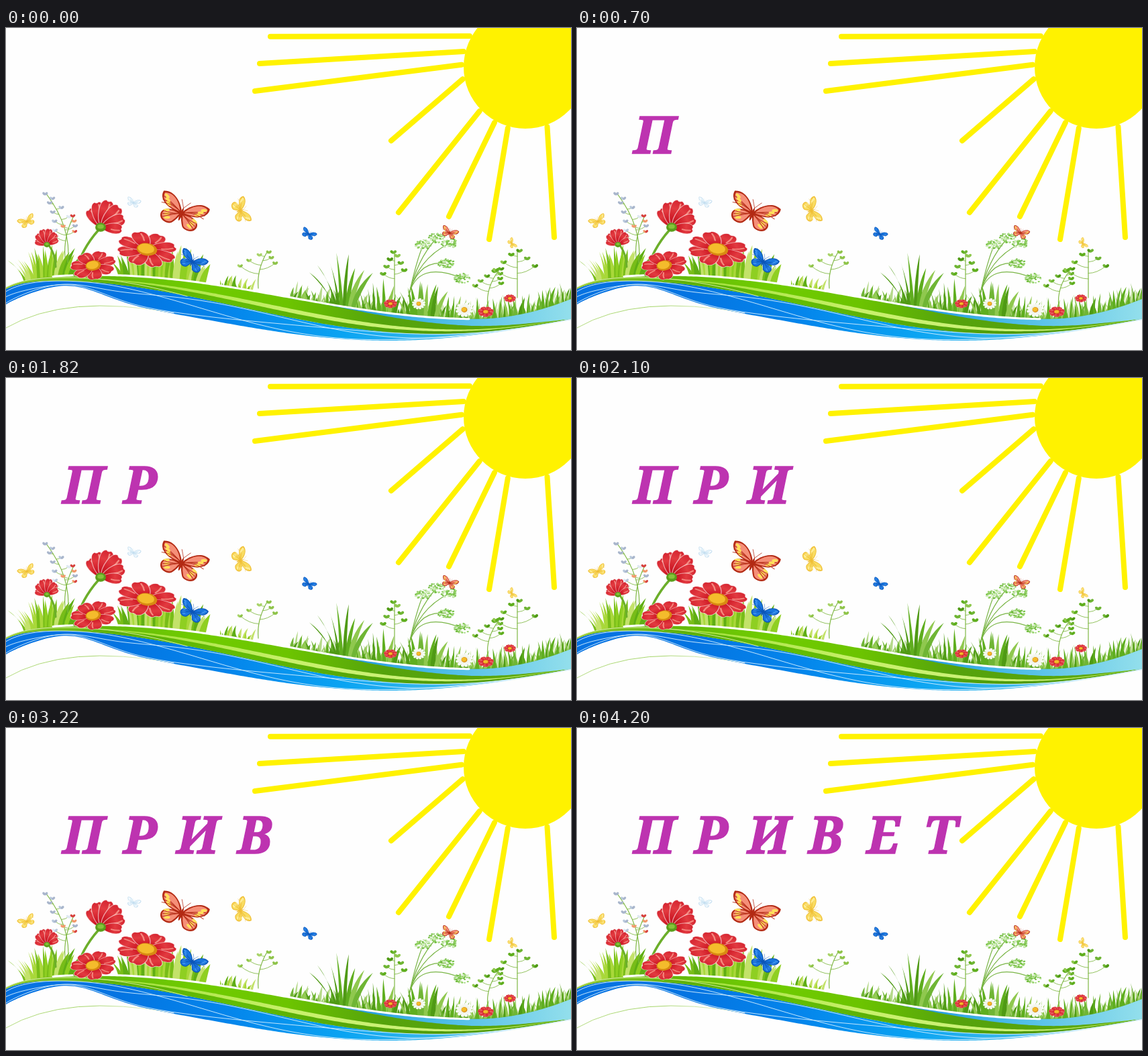
An HTML page with a canvas for the animation above (4.9 s loop, 842x480 px).

```html
<!DOCTYPE html>
<html lang="ru">
<head>
<meta charset="utf-8">
<title>Привет</title>
<style>
html, body { margin: 0; width: 842px; height: 480px; overflow: hidden; background: #fefefe; }
canvas, .word { position: absolute; left: 0; top: 0; height: 480px; }
.word { overflow: hidden; animation: type 4.9s steps(7) infinite; }
.word text {
  font: italic 900 76px "Noto Serif", "Liberation Serif", serif;
  text-anchor: middle; fill: #bd33b0; stroke: #bd33b0; stroke-width: 1.4;
}
/* Each step uncovers one 85.2px letter cell */
@keyframes type { from { width: 77px; } to { width: 673.4px; } }
</style>
</head>
<body>
<canvas width="842" height="480"></canvas>
<svg class="word"></svg>
<script>
const W = 842, H = 480;
const c = document.querySelector('canvas').getContext('2d');
const { sin, cos, exp, max, sqrt, PI } = Math;

let seed = 7;
const rnd = (a = 0, b = 1) => {
  seed = (seed * 16807) % 2147483647;
  return a + (b - a) * seed / 2147483647;
};
const pick = list => list[Math.floor(rnd(0, list.length))];

function fill(path, color) { c.fillStyle = color; c.fill(path); }

function stroke(path, color, width = 1) {
  c.strokeStyle = color;
  c.lineWidth = width;
  c.lineCap = c.lineJoin = 'round';
  c.stroke(path);
}

function at(x, y, angle, size, draw) {
  c.save();
  c.translate(x, y);
  c.rotate(angle * PI / 180);
  c.scale(size, size);
  draw();
  c.restore();
}

function oval(x, y, rx, ry, color, angle = 0) {
  const p = new Path2D();
  p.ellipse(x, y, rx, ry, angle, 0, 7);
  fill(p, color);
}

function arc(x0, y0, cx, cy, x1, y1) {
  const p = new Path2D();
  p.moveTo(x0, y0);
  p.quadraticCurveTo(cx, cy, x1, y1);
  return p;
}

function gradient(x0, y0, x1, y1, colors) {
  const g = c.createLinearGradient(x0, y0, x1, y1);
  colors.forEach((color, i) => g.addColorStop(i / (colors.length - 1), color));
  return g;
}
const across = (...colors) => gradient(0, 0, W, 0, colors);

// Ribbon edges: a cosine swell that droops at the left end
const wave = (x, crest, trough, top, bottom) =>
  (top + bottom) / 2 - (bottom - top) / 2 * cos((x - crest) / (trough - crest) * PI) + 11 * exp(-x / 25);
const hill = x => wave(x, 130, 710, 368, 434) - 22 * (max(0, x - 690) / 152) ** 2;
const seam = x => wave(x, 60, 640, 376, 456);
const keel = x => wave(x, 30, 570, 404, 466) - 22 * exp(-(((x - 95) / 70) ** 2));
const mix = (f, g, t) => x => f(x) + (g(x) - f(x)) * t(x);

function trace(f, x0, x1, path = new Path2D()) {
  const step = x1 > x0 ? 4 : -4;
  for (let x = x0; (x1 - x) * step > 0; x += step) path.lineTo(x, f(x));
  path.lineTo(x1, f(x1));
  return path;
}

function band(top, bottom, color, x0 = 0) {
  fill(trace(bottom, W, x0, trace(top, x0, W)), color);
}

function sun(x, y, r) {
  const color = '#fff200';
  // Outer tip of each ray and the angle at which it meets the disc
  const rays = [[394, 12.7, 209], [378, 53, 194], [371, 94, 182], [574, 168, 169],
    [585, 275, 136], [660, 281, 119], [720, 315, 106], [817, 312, 70]];
  for (const [tx, ty, deg] of rays) {
    const a = deg * PI / 180, fx = x + (r + 3) * cos(a), fy = y + (r + 3) * sin(a);
    stroke(arc(tx, ty, tx, ty, fx, fy), color, 8);
  }
  oval(x, y, r, r, color);
}

const lime = ['#8fcf22', '#78bd18', '#a9d83a', '#c3e26a', '#5fae14'];
const leaf = ['#4f9a14', '#6fb534', '#8fc84e', '#5fae1e'];
const pale = ['#b5d98a', '#c9e4a8', '#a2cf70'];

function blade(x, y, dx, h, w, color) {
  const p = new Path2D();
  p.moveTo(x - w / 2, y);
  p.quadraticCurveTo(x - w / 2 + dx * .15, y - h * .6, x + dx, y - h);
  p.quadraticCurveTo(x + w / 2 + dx * .3, y - h * .5, x + w / 2, y);
  fill(p, color);
}

function lawn(x0, x1, h, colors, gap = 3) {
  for (let x = x0; x < x1; x += gap) {
    blade(x, hill(x) + 4, rnd(-7, 9), h * rnd(.3, 1), rnd(2.5, 5), pick(colors));
  }
}

function fan(x, width, reach, h, n, colors, w = 7) {
  for (let i = 0; i < n; i++) {
    const u = 2 * i / (n - 1) - 1, root = x + u * width;
    blade(root, hill(root) + 4, u * reach + rnd(-4, 4), h * (1 - .35 * u * u) * rnd(.65, 1), w * rnd(.7, 1.2), pick(colors));
  }
}

function grass() {
  fan(65, 35, 24, 54, 26, lime);
  fan(232, 60, 12, 60, 36, lime, 8);
  lawn(320, 368, 24, lime);
  lawn(425, W, 32, pale);
  lawn(425, 480, 24, leaf);
  lawn(480, W, 38, leaf);
  fan(502, 14, 34, 92, 8, leaf, 6);
  fan(560, 18, 8, 58, 6, leaf, 5);
  fan(618, 22, 16, 74, 10, leaf);
}

function ribbons() {
  const gloss = x => .5 + .45 * (x / W) ** 3;
  const sheen = mix(hill, seam, gloss);
  band(seam, keel, across('#0672e2', '#0474e2', '#0486ec', '#0aa4f2', '#45bdea', '#9be4ee'));
  band(hill, seam, across('#a5cf3c', '#64b80c', '#70cc00', '#6cc400', '#55a20c', '#58a50c', '#67ae14'));
  band(sheen, seam, across('#8cc630', '#5cb008', '#62bc04', '#56a808', '#4d980c', '#5ca80e'));
  band(hill, mix(hill, seam, x => (max(0, x - 410) / 432) ** 1.7),
    across('#0a80d8', '#0a80d8', '#0a80d8', '#45b8e6', '#93dfec'), 410);
  band(sheen, mix(hill, seam, x => gloss(x) + .2 * sin(PI * x / W)),
    across('#8cd020', '#a8e440', '#c8f06a', '#cdf27a', '#a5dc4a'));
  for (let i = 0; i < 3; i++) {
    stroke(trace(mix(seam, keel, x => .5 + .45 * sin(x / 130 + 2 * i)), 0, W), '#d7f0ff', .9);
  }
  stroke(trace(mix(hill, seam, x => x / 260), 0, 270), '#d3eda0');
  stroke(trace(hill, 70, 690), '#ffffff', 3);
  stroke(arc(0, 447, 90, 395, 250, 425), gradient(0, 0, 250, 0, ['#b4dc80', '#a4d468', '#fefefe']));
}

function petal(wide, ...colors) {
  const p = new Path2D('M0 0C' + [-wide, -.3, -wide * 1.3, -.95, -wide * .3, -1] +
    'Q0 -.93 ' + wide * .3 + ' -1C' + [wide * 1.3, -.95, wide, -.3, 0, 0] + 'Z');
  fill(p, gradient(0, 0, 0, -1, colors));
  stroke(p, '#ffffff99', .03);
}
const redPetal = wide => {
  petal(wide, '#b01020', '#d01c28', '#e23a40', '#d42430');
  stroke(arc(wide * .2, -.5, wide * .35, -.7, wide * .25, -.88), '#f58a80', .06);
};
const whitePetal = () => petal(.2, '#e4ead6', '#ffffff');

function bloom(x, y, rx, ry, tilt, n, draw) {
  at(x, y, tilt, 1, () => {
    c.scale(rx, ry);
    for (let i = 0; i < n; i++) at(0, 0, (i + .5) * 360 / n, 1, draw);
    oval(0, 0, .34, .36, '#d88a12');
    oval(-.03, -.04, .27, .28, '#f4bc2c');
  });
}

function cup(x, y, size, from, to) {
  for (let i = 0; i < 6; i++) {
    const u = i / 5;
    at(x, y, from + (to - from) * u, size * (.8 + .25 * sin(PI * u)), () => redPetal(.27));
  }
  oval(x, y, size * .2, size * .17, '#5a9f1c');
  oval(x, y - 1, size * .12, size * .08, '#86c23a');
}

function flowers() {
  stroke(arc(138, 301, 112, 330, 102, 368), '#6cae2a', 3.5);
  stroke(arc(64, 324, 74, 338, 74, 356), '#6cae2a', 3);
  cup(141, 297, 40, -35, 95);
  cup(61, 323, 23, -75, 65);
  bloom(210, 330, 45, 26, 8, 8, () => redPetal(.32));
  bloom(130, 354, 34, 21, -8, 7, () => redPetal(.36));
  for (const [x, y, r] of [[573, 411, 10], [715, 423, 12], [751, 403, 9]]) {
    bloom(x, y, r, r * .65, 0, 7, () => redPetal(.4));
  }
  for (const [x, y, r] of [[615, 411, 10], [683, 420, 13]]) bloom(x, y, r, r * .85, 0, 12, whitePetal);
}

// Curved stem with leaf pairs on alternating side twigs
function sprig(x, y, lean, h, n, spread, size, colors) {
  stroke(arc(x, y, x - lean * .2, y - h * .5, x + lean, y - h), '#7fb843', 1.2);
  for (let i = 0; i <= n; i++) {
    const t = .4 + .6 * i / n, side = i % 2 ? 1 : -1;
    const px = x - lean * .4 * t * (1 - t) + lean * t * t, py = y - h * t;
    const tx = px + side * spread * (1.6 - 1.5 * t), ty = py - spread * .7 * (1 - t);
    stroke(arc(px, py, (px + tx) / 2, py, tx, ty), '#86bc4c', .9);
    for (const d of [-1, 1]) oval(tx + d * size * .6, ty, size, size * .65, pick(colors), -.7 * d);
  }
}

function umbel(x, y, r) {
  stroke(arc(600, 400, 612, 345, x, y), '#79b545', 1.2);
  for (let i = 0; i < 60; i++) {
    const a = rnd(0, 2 * PI), d = r * sqrt(rnd());
    oval(x + d * cos(a), y + d * sin(a) * .6, 1.6, 1.1, pick(['#8ccf5c', '#a9dc86', '#6fbb3c', '#d0ecba']));
  }
}

function plants() {
  sprig(92, 350, -32, 103, 8, 17, 2.8, ['#b9c8dc', '#dfe8f2', '#a9b6cc']);
  sprig(88, 342, 13, 62, 4, 15, 2.6, ['#d8423e', '#f29a6a']);
  sprig(376, 388, 13, 54, 5, 28, 2.8, ['#8fc44a', '#a8d468']);
  sprig(579, 400, 0, 66, 6, 17, 3.2, leaf);
  sprig(718, 415, 18, 56, 7, 20, 3, leaf);
  sprig(762, 402, 0, 70, 5, 32, 3.2, leaf);
  for (const [x, y] of [[622, 323], [642, 313], [661, 321], [656, 351], [680, 373]]) umbel(x, y, 12);
}

const red = { edge: '#b32a14', wing: '#f58f78', spot: '#ffe25a' };
const blue = { edge: '#0b55b8', wing: '#1a76de', spot: '#3c90ee' };
const gold = { edge: '#efbe34', wing: '#f9dc62', spot: '#fff0a0' };
const ice = { edge: '#c2dcef', wing: '#e6f3fb', spot: '#ffffff' };

// Wings spread about a body that points up
function butterfly(x, y, tilt, size, { edge, wing, spot }) {
  const upper = new Path2D('M0 0C6 -13 22 -27 37 -20C39 -10 30 2 0 2Z');
  const lower = new Path2D('M0 2C14 -2 30 3 29 13C27 24 12 24 8 19Q3 12 0 2Z');
  at(x, y, tilt, size, () => {
    for (const side of [-1, 1]) {
      c.save();
      c.scale(side, 1);
      for (const [shape, cx, cy] of [[lower, 16, 10], [upper, 21, -10]]) {
        fill(shape, edge);
        at(cx * .18, cy * .18, 0, .82, () => fill(shape, wing));
        for (let i = -1; i <= 1; i++) {
          oval(cx * (1.25 - .15 * i), cy + 5 * i, 4.5, 2, spot, cy / 25);
          stroke(arc(0, 1, cx * .8, cy * .8, cx * 1.6, cy + 5 * i + 2), edge, .9);
        }
      }
      c.restore();
      stroke(arc(0, -7, side * 3, -12, side * 7, -18), edge, .7);
    }
    oval(0, 3, 1.8, 10, edge);
  });
}

function butterflies() {
  butterfly(262, 275, 22, 1, red);
  butterfly(350, 272, 72, .52, gold);
  butterfly(278, 348, 28, .57, blue);
  butterfly(451, 307, 28, .3, blue);
  butterfly(190, 260, 18, .28, ice);
  butterfly(31, 288, -25, .35, gold);
  butterfly(661, 305, 22, .34, red);
  butterfly(754, 321, 60, .22, gold);
}

c.fillStyle = '#fefefe';
c.fillRect(0, 0, W, H);
sun(774, 58, 92);
grass();
plants();
ribbons();
flowers();
butterflies();

document.querySelector('.word').innerHTML = [...'ПРИВЕТ']
  .map((letter, i) => `<text x="${115 + 85.2 * i}" y="187.2">${letter}</text>`).join('');
</script>
</body>
</html>
```
